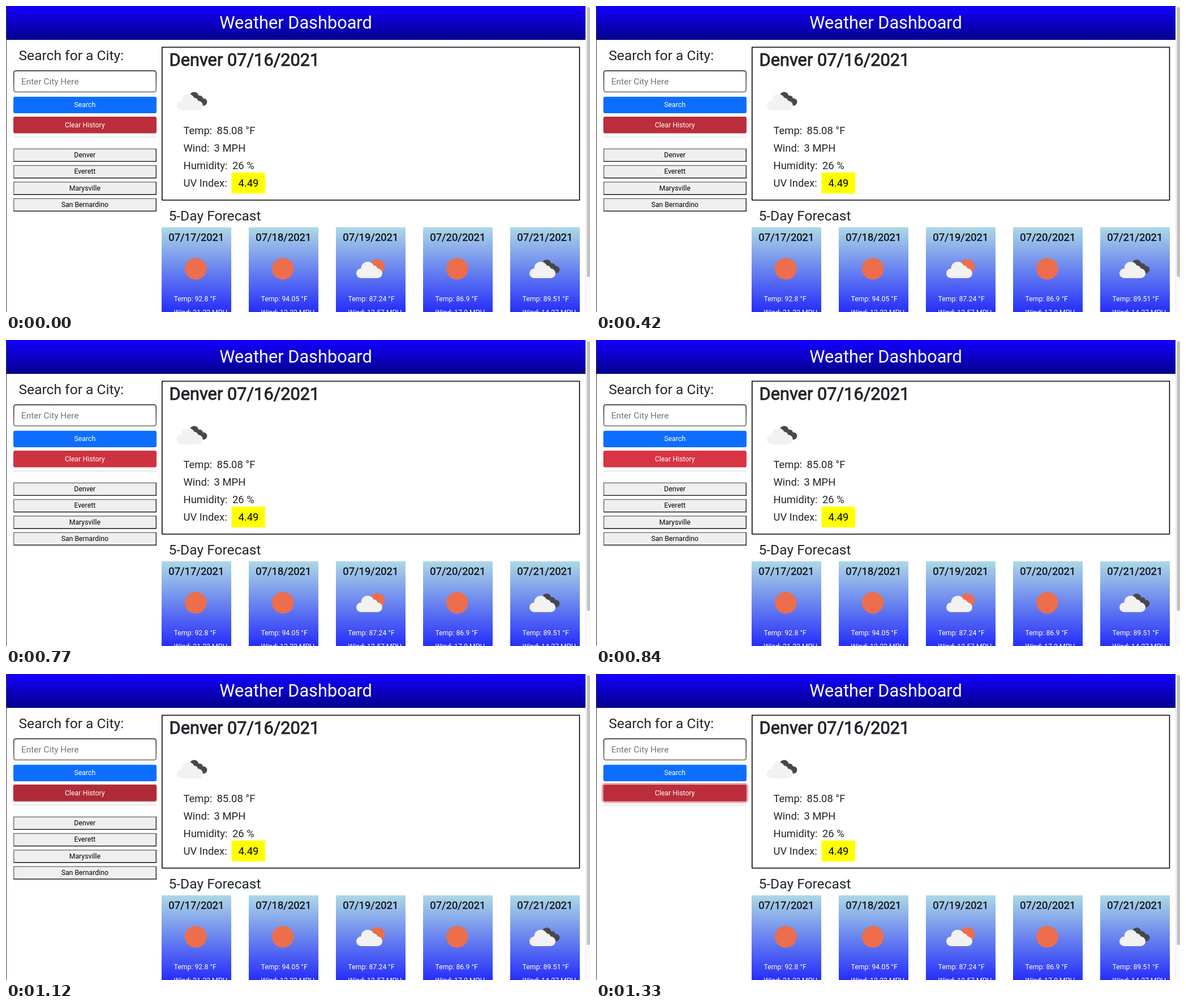
These frames come from a looping animation (1032x542 px, 2170 ms). An HTML page with a canvas:

```html
<!DOCTYPE html>
<html lang="en">
<head>
<meta charset="utf-8">
<title>Weather Dashboard</title>
<style>
html, body { margin: 0; width: 100%; height: 100%; overflow: hidden; background: #fff; }
canvas { display: block; }
</style>
</head>
<body>
<canvas id="stage" width="1032" height="542"></canvas>
<script>
const ctx = document.getElementById('stage').getContext('2d');
const LOOP = 2170, STEP = 70, CLEARED = 1190;
const H1 = 30.72, H2 = 24.58, H4 = 18.43, INPUT = 15.36, SMALL = 12.29;
const INK = '#212529';

const cities = ['Denver', 'Everett', 'Marysville', 'San Bernardino'];
const today = [['Temp:', '85.08 °F', 372.5], ['Wind:', '3 MPH', 367.5],
  ['Humidity:', '26 %', 400], ['UV Index:', '4.49', 410.5]];
const days = [
  { date: '07/17/2021', temp: '92.8', wind: '21.22', sky: 'sun' },
  { date: '07/18/2021', temp: '94.05', wind: '12.22', sky: 'sun' },
  { date: '07/19/2021', temp: '87.24', wind: '12.57', sky: 'partly' },
  { date: '07/20/2021', temp: '86.9', wind: '17.9', sky: 'sun' },
  { date: '07/21/2021', temp: '89.51', wind: '14.27', sky: 'cloudy' }
];

// Clear button: time, red, green, blue, focus ring (0..1)
const clearKeys = [
  [0, 187, 45, 59, 0], [630, 187, 45, 59, 0], [700, 192, 46, 61, 0],
  [770, 206, 50, 65, 0], [840, 217, 52, 68, 0], [910, 220, 53, 69, 0],
  [1050, 187, 45, 59, 0], [1120, 176, 42, 55, 0.5], [1190, 176, 42, 55, 1],
  [1330, 187, 45, 59, 1], [LOOP, 187, 45, 59, 1]
];

function clearState(t) {
  const i = clearKeys.findIndex(k => k[0] > t);
  const a = clearKeys[i - 1], b = clearKeys[i];
  const p = (t - a[0]) / (b[0] - a[0]);
  return a.map((v, n) => v + (b[n] - v) * p);
}

function rect(x, y, w, h, color) {
  ctx.fillStyle = color;
  ctx.fillRect(x, y, w, h);
}

function rounded(x, y, w, h, r, color) {
  ctx.fillStyle = color;
  ctx.beginPath();
  ctx.roundRect(x, y, w, h, r);
  ctx.fill();
}

function text(str, x, y, size, color = INK, align = 'left', weight = 0) {
  ctx.font = `400 ${size}px Roboto, sans-serif`;
  ctx.textAlign = align;
  ctx.fillStyle = color;
  ctx.fillText(str, x, y);
  if (weight) {
    ctx.strokeStyle = color;
    ctx.lineWidth = weight;
    ctx.lineJoin = 'round';
    ctx.strokeText(str, x, y);
  }
}

function vertical(y0, y1, top, bottom) {
  const g = ctx.createLinearGradient(0, y0, 0, y1);
  g.addColorStop(0, top);
  g.addColorStop(1, bottom);
  return g;
}

function disc(x, y, r, color) {
  ctx.fillStyle = color;
  ctx.beginPath();
  ctx.arc(x, y, r, 0, Math.PI * 2);
  ctx.fill();
}

// x, y is the lower left corner of the cloud
function cloud(x, y, color) {
  disc(x + 8.5, y - 8.5, 8.5, color);
  disc(x + 20, y - 17.5, 11.5, color);
  disc(x + 30.5, y - 15, 7.5, color);
  disc(x + 37.5, y - 8.5, 8.5, color);
  rect(x + 8.5, y - 14, 29, 14, color);
}

function cloudy(x, y) {
  const dark = '#48484a';
  disc(x + 30.5, y - 24.8, 8, dark);
  disc(x + 40, y - 20.5, 6, dark);
  disc(x + 47, y - 15, 6.4, dark);
  rect(x + 32, y - 20, 15, 11.4, dark);
  cloud(x, y, '#f2f2f2');
}

function header() {
  rect(0, 0, 1024, 60, vertical(0, 60, '#1400ff', '#04008b'));
  text('Weather Dashboard', 512, 40, H1, '#fff', 'center');
}

// Two-tone border: light sits on one pair of sides
function listButton(label, y) {
  rect(13, y, 253, 23.5, '#767676');
  ctx.fillStyle = '#1d1d1d';
  ctx.beginPath();
  [[266, y], [266, y + 23.5], [13, y + 23.5], [14.5, y + 22], [264.5, y + 22], [264.5, y + 1.5]]
    .forEach(p => ctx.lineTo(...p));
  ctx.fill();
  rect(14.5, y + 1.5, 250, 20.5, '#efeff0');
  text(label, 139.3, y + 15.6, SMALL, '#000', 'center');
}

function inputBox() {
  ctx.lineWidth = 1.5;
  ctx.strokeStyle = vertical(114, 153, '#1e1e1e', '#6c6c6c');
  ctx.beginPath();
  ctx.roundRect(13.75, 114.75, 251.5, 37.5, 3.5);
  ctx.stroke();
  text('Enter City Here', 27, 139, INPUT, '#6c757d');
}

function sidebar(t) {
  text('Search for a City:', 22.5, 96, H2);
  inputBox();
  rounded(13, 160.7, 253, 29.3, 3, '#0d6efd');
  text('Search', 139.3, 179.2, SMALL, '#fff', 'center');

  rect(13, 231.6, 253, 1, '#d2d3d4');
  const [, r, g, b, ring] = clearState(t);
  if (ring) {
    const s = 3.1 * ring;
    rounded(13 - s, 196.1 - s, 253 + 2 * s, 29.4 + 2 * s, 3 + s, `rgba(225,83,97,${0.5 * ring})`);
  }
  rounded(13, 196.1, 253, 29.4, 3, `rgb(${r},${g},${b})`);
  text('Clear History', 139.3, 214.7, SMALL, '#fff', 'center');

  if (t < CLEARED) cities.forEach((c, i) => listButton(c, 252.5 + i * 29.3));
}

function current() {
  ctx.lineWidth = 1.6;
  ctx.strokeStyle = '#000';
  ctx.strokeRect(275.8, 73, 737.7, 270.8);
  text('Denver 07/16/2021', 288.5, 106, H1, INK, 'left', 0.9);
  cloudy(302, 185);
  rect(398.5, 295, 59.5, 37, '#ff0');
  today.forEach(([label, value, x], i) => {
    const y = 227 + i * 31;
    text(label, 313.5, y, H4);
    text(value, x, y, H4, i === 3 ? '#000' : INK);
  });
}

function card(day, i) {
  const x = 275 + i * 154;
  rect(x, 392, 123, 150, vertical(392, 583, '#add8e6', '#0000ff'));
  text(day.date, x + 12.3, 415.5, H4, '#080a0c', 'left', 0.3);
  if (day.sky === 'sun') disc(x + 60.3, 465.5, 19.3, '#ec6e4c');
  if (day.sky === 'partly') {
    disc(x + 73.2, 461.5, 13, '#ec6e4c');
    cloud(x + 36, 482, '#f2f2f2');
  }
  if (day.sky === 'cloudy') cloudy(x + 34, 482);
  text(`Temp: ${day.temp} °F`, x + 21.5, 522.7, SMALL, '#fff');
  text(`Wind: ${day.wind} MPH`, x + 21.5, 546.5, SMALL, '#fff');
}

function chrome() {
  rect(1024, 0, 8, 542, '#fafafa');
  rect(1024, 0, 1, 542, '#e8e8e8');
  rounded(1026.5, 2, 5.5, 478, 2.7, '#c1c1c1');
  rect(0, 0, 1, 542, '#3a3a3c');
}

function draw(now) {
  const t = Math.floor((now % LOOP) / STEP) * STEP;
  rect(0, 0, 1032, 542, '#fff');
  header();
  sidebar(t);
  current();
  text('5-Day Forecast', 287.5, 380, H2);
  days.forEach(card);
  chrome();
}

let start;
function tick(now) {
  start ??= now;
  draw(now - start);
  requestAnimationFrame(tick);
}
draw(0);
requestAnimationFrame(tick);
</script>
</body>
</html>
```
